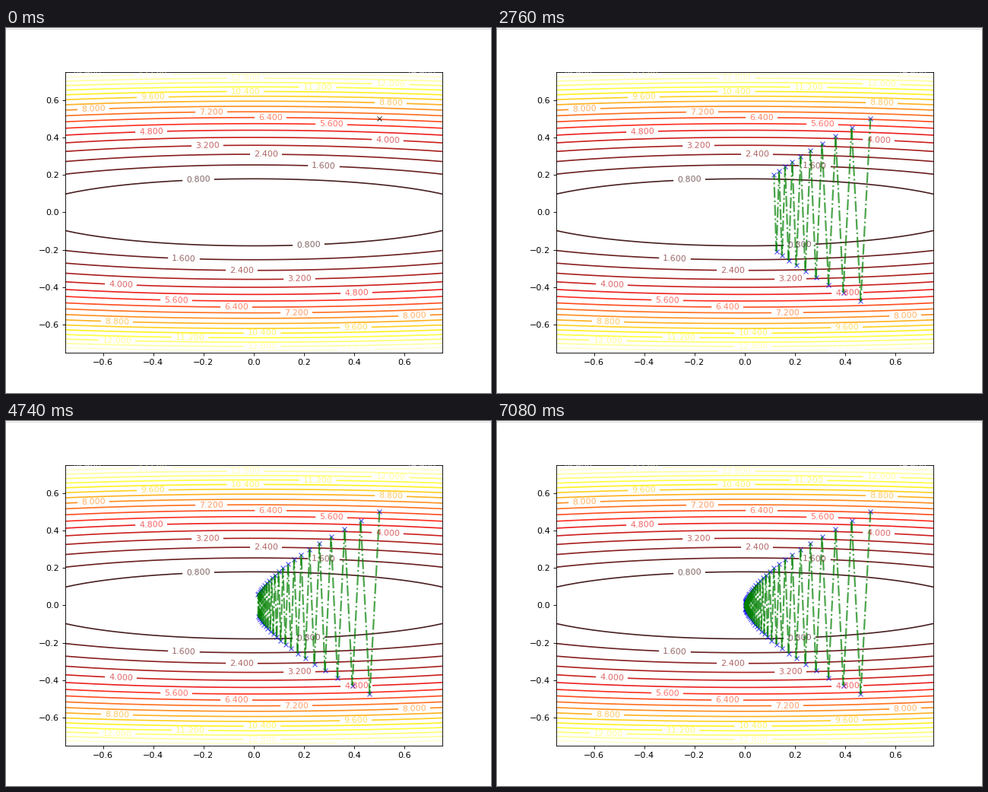
Recreate the animation shown at these times as a matplotlib script. Size 638x480 px, loop 7.11 s.

```python
import numpy as np
import matplotlib.pyplot as plt
from matplotlib.animation import FuncAnimation
from matplotlib.collections import LineCollection
from matplotlib.lines import Line2D

W, H, DPI = 638, 480, 80
FRAMES, INTERVAL = 237, 30
LIM = 0.75
RATE = 0.039                     # gradient descent learning rate
WAIT, PER_STEP = 39.7, 2.79      # in frames
LEFT, WIDTH = 78, 496            # axes box in pixels

plt.rcParams["font.family"] = "DejaVu Sans"
fig = plt.figure(figsize=(W / DPI, H / DPI), dpi=DPI, facecolor="white")
ax = fig.add_axes([LEFT / W, 0.11, WIDTH / W, 0.77])
ax.set(xlim=(-LIM, LIM), ylim=(-LIM, LIM))

# thin window edge along the top and right
fig.add_artist(Line2D([0, 1 - 0.5 / W, 1 - 0.5 / W],
                      [1 - 0.5 / H, 1 - 0.5 / H, 0], color="0.84", lw=0.9))

# bowl x^2 + 25 y^2
grid = np.linspace(-LIM, LIM, 151)
X, Y = np.meshgrid(grid, grid)
levels = 0.8 * np.arange(1, 19)
bowl = ax.contour(X, Y, X**2 + 25 * Y**2, levels=levels, cmap="hot",
                  vmin=0, vmax=14.4, linewidths=1.5)

# label centres in pixels, one per level, for the upper and lower branch
upper = [253, 418, 342, 265, 502, 191, 428, 348, 270, 115, 506, 193,
         315, 410, 506, 315, 193]
lower = [398, 234, 310, 386, 151, 461, 224, 303, 382, 537, 146, 460,
         337, 242, 146, 337, 460]


def on_level(level, x, side):
    return x, side * np.sqrt(level - x**2) / 5


def to_data(px):
    return (px - LEFT) / WIDTH * 2 * LIM - LIM


spots = [on_level(v, to_data(px), side)
         for side, row in ((1, upper), (-1, lower))
         for v, px in zip(levels, row)]
spots += [on_level(levels[-1], sx * 0.666, sy)
          for sx in (-1, 1) for sy in (-1, 1)]
labels = ax.clabel(bowl, fmt="%.3f", fontsize=10, manual=spots)
for text in labels:
    text.set_alpha(0.6)
bowl.set_alpha(0.88)

# descent path: each coordinate shrinks by its own factor
steps = int((FRAMES - WAIT) / PER_STEP) + 1
k = np.arange(steps + 1)
path = 0.5 * np.column_stack([(1 - 2 * RATE) ** k, (1 - 50 * RATE) ** k])
segments = np.stack([path[:-1], path[1:]], axis=1)

marks, = ax.plot([], [], "x", color="b", ms=6, alpha=0.7, zorder=2.1)
trail = LineCollection([], colors="g", linewidths=2, linestyles="dashdot",
                       alpha=0.7, zorder=2.2)
ax.add_collection(trail, autolim=False)


def update(i):
    n = max(0, int((i - WAIT) // PER_STEP))
    marks.set_data(path[:n + 1, 0], path[:n + 1, 1])
    marks.set_color("b" if n else "k")
    trail.set_segments(segments[:n])
    return marks, trail


anim = FuncAnimation(fig, update, frames=FRAMES, interval=INTERVAL,
                     repeat=True, repeat_delay=0, blit=False)
plt.show()
```
